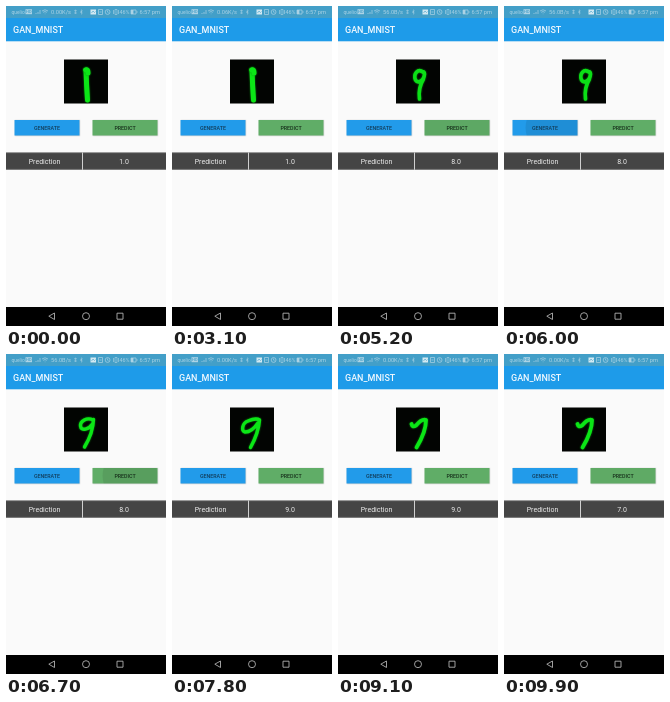
An HTML page with a canvas that plays this animation: 160x320 px, repeating every 10000 ms.

```html
<!DOCTYPE html>
<html lang="en">
<head>
<meta charset="utf-8">
<title>GAN_MNIST</title>
<style>
  html, body { margin: 0; width: 100%; height: 100%; overflow: hidden; background: #fafafa; }
  canvas { display: block; width: 100vw; height: 100vh; }
</style>
</head>
<body>
<canvas id="stage"></canvas>
<script>
const W = 160, H = 320, LOOP = 10000;
const canvas = document.getElementById('stage');
const ctx = canvas.getContext('2d');
const FONT = 'Roboto, sans-serif';

// Each track is a list of [start time, value].
const speeds = [[0, '0.00K/s'], [3100, '0.06K/s'], [4900, '56.0B/s'], [7700, '0.00K/s']];
const results = [[0, '1.0'], [5100, '8.0'], [6900, '9.0'], [9800, '7.0']];
const digits = [[0, drawOne], [4000, drawLoop], [6100, drawNine], [7400, drawOpenNine], [8900, drawSeven]];

const buttons = [
  { x: 8.5, label: 'GENERATE', fill: '#229bea', ink: '#123e5c', touch: 49,
    presses: [[3700, 900], [5900, 500], [7100, 500], [8700, 400]] },
  { x: 86.5, label: 'PREDICT', fill: '#60ad67', ink: '#18331c', touch: 124,
    presses: [[4900, 500], [6600, 500], [8000, 500], [9600, 400]] }
];

function valueAt(track, t) {
  let value = track[0][1];
  for (const [start, v] of track) if (t >= start) value = v;
  return value;
}

function rect(x, y, w, h, color) {
  ctx.fillStyle = color;
  ctx.fillRect(x, y, w, h);
}

function text(str, x, y, size, color, align = 'left', weight = 400) {
  ctx.font = `${weight} ${size}px ${FONT}`;
  ctx.textAlign = align;
  ctx.fillStyle = color;
  ctx.fillText(str, x, y);
}

function outline(path, color, width) {
  ctx.strokeStyle = color;
  ctx.lineWidth = width;
  ctx.stroke(new Path2D(path));
}

function drawStatus(t) {
  const ink = '#acd3e5';
  rect(0, 0, W, 12, '#439fc8');
  text('quelio', 5.5, 7.8, 4.9, ink);
  rect(19.5, 3.2, 6.5, 5, ink);
  text('HD', 22.8, 7.3, 4, '#439fc8', 'center', 500);
  outline('M30 8V7M32 8V6M34 8V4', ink, .7);
  outline('M36 5Q39 2.5 42 5M37.2 6.3Q39 4.8 40.8 6.3M38.8 7.8h.5', ink, .7);
  text(valueAt(speeds, t), 45, 7.8, 5.7, ink);
  outline('M68 4.7h3M68 7h3M69.5 3.6v4.4M75.5 3.5v5M74.2 5l2.5 2.2M76.7 4.6l-2.5 2.2', ink, .5);

  rect(84.5, 3.5, 5.5, 5, '#d3e9f2');
  outline('M85.5 7l1.5-2 1.5 1.5 1-1', '#439fc8', .6);
  outline('M92.5 3.5h4v5h-4zM93.5 6h2', ink, .7);
  outline('M104 6a2.4 2.4 0 1 1-4.8 0a2.4 2.4 0 1 1 4.8 0M101.6 4.5v1.7l1 .6', ink, .7);
  outline('M107.5 4v4M109 3.5v5h2v-5zM112.5 4v4', ink, .6);
  text('46%', 113.5, 7.8, 5.4, ink);
  outline('M125 4h5v4h-5zM131 5.2v1.6', ink, .7);
  rect(125, 4, 2.4, 4, ink);
  text('6:57 pm', 154, 7.8, 5.7, ink, 'right');
}

function drawOne() {
  outline('M80 64Q80.5 80 81.5 94', '#0be616', 5);
  outline('M79.8 64Q82 63 82 67', '#0be616', 5);
}

function drawLoop() {
  outline('M85 66C80 62 75 68 77.5 74C80 78 86 75 86.5 68Q86.5 65 83.5 65.5M85.5 73Q80 82 81.5 93', '#0bdf16', 3.6);
}

function drawNine() {
  outline('M87 66C81 63 74 67 74.5 72C75 77.5 83 75.5 87 69.5M87.5 65.5Q87 79 78.5 93', '#0be616', 3.4);
}

function drawOpenNine() {
  outline('M76 67C70 69 69 77.5 73 78C78 78 83 73.5 86 69M76 67Q84 63.5 87.5 66Q86.5 79 78.5 93.5', '#0be616', 3.4);
}

function drawSeven() {
  outline('M73.5 70Q74.5 74 78 71.5C81 68 84.5 64.5 88 66Q88 78 78.5 93.5', '#0be616', 3.8);
}

function drawPicture(t) {
  rect(58, 53.5, 44, 44, '#020402');
  ctx.save();
  ctx.lineCap = ctx.lineJoin = 'round';
  ctx.shadowColor = '#0c9912';
  ctx.shadowBlur = 2 * canvas.width / W;
  valueAt(digits, t)();
  ctx.restore();
}

function drawButton(b, t) {
  const y = 114, w = 65, h = 15.5;
  ctx.save();
  ctx.shadowColor = 'rgba(0,0,0,.2)';
  ctx.shadowBlur = 1.2 * canvas.width / W;
  ctx.shadowOffsetY = .4 * canvas.height / H;
  rect(b.x, y, w, h, b.fill);
  ctx.restore();

  const press = b.presses.find(([start, span]) => t >= start && t < start + span);
  if (press) {
    const p = (t - press[0]) / press[1];
    const grow = 1 - (1 - p) ** 2;
    ctx.save();
    ctx.beginPath();
    ctx.rect(b.x, y, w, h);
    ctx.clip();
    ctx.fillStyle = `rgba(0,0,0,${.12 * (1 - p) ** 1.5})`;
    ctx.beginPath();
    ctx.arc(b.touch, y + h / 2, 10 * Math.min(1, p * 8) + 48 * grow, 0, 2 * Math.PI);
    ctx.fill();
    ctx.restore();
  }
  text(b.label, b.x + w / 2, 123.8, 5.3, b.ink, 'center', 500);
}

function drawTable(t) {
  rect(0, 146.4, W, 17.4, '#5c5c5c');
  rect(0, 147.4, W, 15.4, '#454545');
  rect(76, 146.4, 1, 17.4, '#d0d0d0');
  text('Prediction', 38.5, 157.6, 7, '#ececec', 'center');
  text(valueAt(results, t), 118, 157.6, 7, '#ececec', 'center');
}

function drawNav() {
  rect(0, 301, W, 19, '#000');
  outline('M48.5 307v6.5L42.8 310.2Z', '#b0b0b0', .9);
  outline('M83.5 310.2a3.5 3.5 0 1 1-7 0a3.5 3.5 0 1 1 7 0', '#b0b0b0', .9);
  outline('M111 307.2h6v6h-6z', '#b0b0b0', .9);
}

function resize() {
  const ratio = window.devicePixelRatio || 1;
  canvas.width = Math.round(innerWidth * ratio);
  canvas.height = Math.round(innerHeight * ratio);
}

function draw(now) {
  const t = now % LOOP;
  ctx.setTransform(canvas.width / W, 0, 0, canvas.height / H, 0, 0);
  rect(0, 0, W, H, '#fafafa');
  drawStatus(t);
  rect(0, 12, W, 23.3, '#1e9be9');
  text('GAN_MNIST', 7, 27, 9, '#f0f8fe', 'left', 500);
  drawPicture(t);
  for (const b of buttons) drawButton(b, t);
  drawTable(t);
  drawNav();
}

const begin = performance.now();
function tick() {
  draw(performance.now() - begin);
  requestAnimationFrame(tick);
}

addEventListener('resize', resize);
resize();
tick();
</script>
</body>
</html>
```
